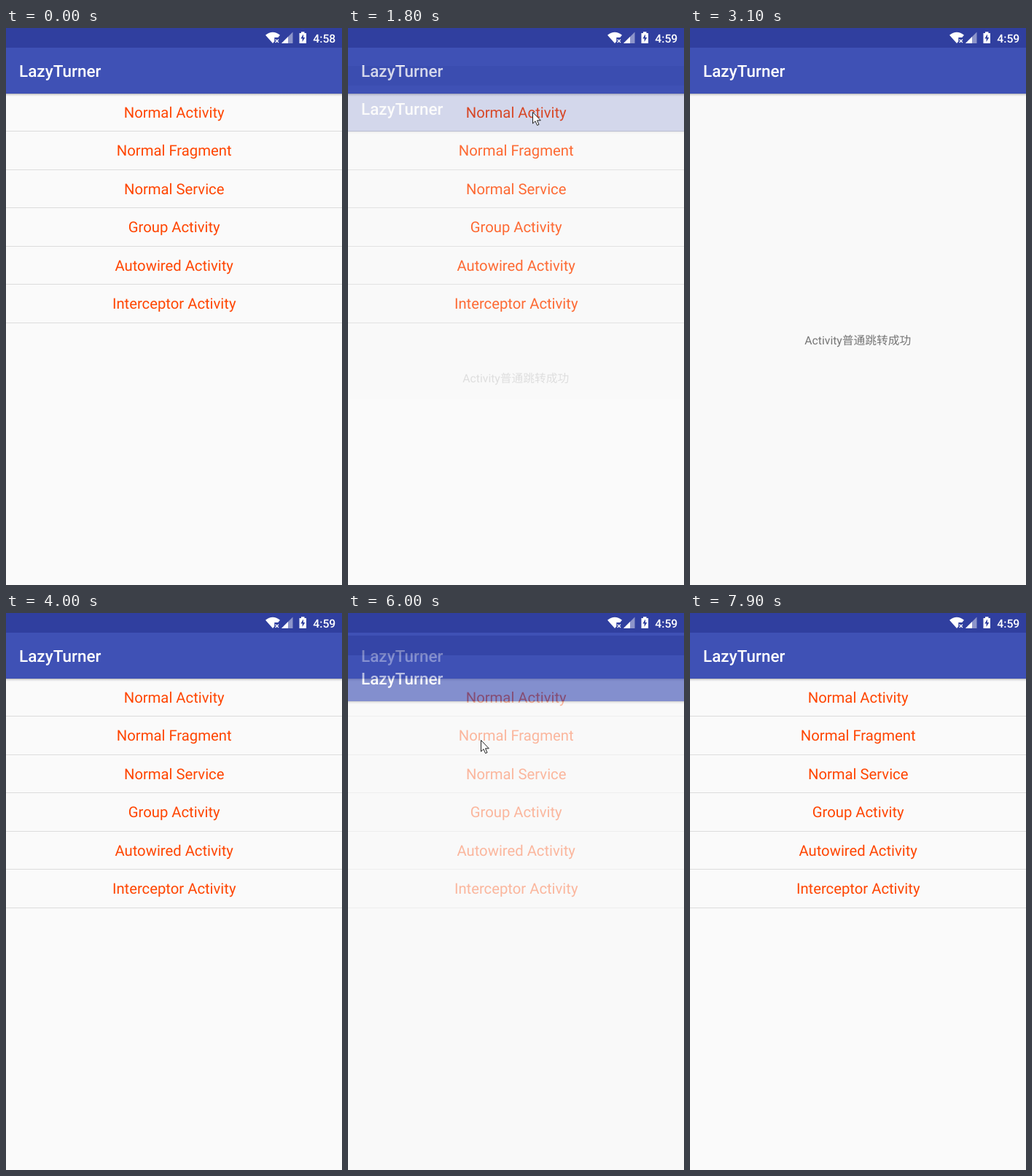
An HTML page for the animation above (8000 ms loop, 461 px wide and 764 px high).

```html
<!DOCTYPE html>
<html lang="zh-CN">
<head>
<meta charset="utf-8">
<title>Router demo</title>
<style>
  html, body { margin: 0; width: 100%; height: 100%; overflow: hidden; background: #fafafa; }
  svg { display: block; width: 461px; height: 764px; }
  text { font-family: Roboto, "Noto Sans CJK SC", "Noto Sans CJK", sans-serif; text-rendering: geometricPrecision; }
  .title { font-size: 22.5px; font-weight: 500; fill: #fff; }
  .row { font-size: 20.25px; fill: #ff4500; text-anchor: middle; }
  .note { font-size: 15.75px; fill: #757575; text-anchor: middle; }
  .clock { font-size: 15.75px; font-weight: 500; fill: #fff; text-anchor: end; }
</style>
</head>
<body>
<svg viewBox="0 0 461 764">
  <defs>
    <linearGradient id="shade" x2="0" y2="1">
      <stop offset="0" stop-opacity=".3"/>
      <stop offset=".4" stop-opacity=".1"/>
      <stop offset="1" stop-opacity="0"/>
    </linearGradient>
    <g id="bar">
      <rect width="461" height="27" fill="#303f9f"/>
      <rect y="27" width="461" height="63" fill="#3f51b5"/>
      <rect y="90" width="461" height="4" fill="url(#shade)"/>
      <text class="title" x="18" y="67">LazyTurner</text>
    </g>
  </defs>

  <g>
    <rect width="461" height="764" fill="#fafafa"/>
    <g id="rows"></g>
    <use href="#bar"/>
  </g>

  <g id="sheet">
    <rect width="461" height="764" fill="#f9f9f9"/>
    <use href="#bar"/>
    <text id="note" class="note" x="230.3" y="434"></text>
  </g>

  <g id="status" fill="#fff">
    <rect width="461" height="27" fill="#303f9f"/>
    <path d="M366 21 356 9.7Q366 2 376 9.7L373.2 13H368.3V18.4Z"/>
    <path d="M369.6 15.6 374 20M374 15.6 369.6 20" stroke="#fff" stroke-width="1.3"/>
    <path d="M378 21 393.5 5.5V21Z" opacity=".45"/>
    <path d="M378 21 387 12V21Z"/>
    <path d="M402.5 7H405V5.2H409.5V7H412V21H402.5Z"/>
    <path d="M408 8.6 404.3 14.6H406.6V19L410.3 13H408Z" fill="#303f9f"/>
    <text id="clock" class="clock" x="452.3" y="20"></text>
  </g>

  <path id="cursor" d="M.5.5V16L4 12.7 6.6 18.5 9 17.4 6.5 11.8H11.3Z" fill="#fff" stroke="#222"/>
</svg>
<script>
const $ = id => document.getElementById(id);
const LOOP = 8000, STEP = 100, SLIDE = 61;

const labels = ['Normal Activity', 'Normal Fragment', 'Normal Service',
  'Group Activity', 'Autowired Activity', 'Interceptor Activity'];
$('rows').innerHTML = labels.map((s, i) =>
  `<text class="row" x="230.7" y="${Math.floor(123.3 + 52.5 * i)}">${s}</text>` +
  `<rect y="${Math.floor(141.5 + 52.5 * i)}" width="461" height="1" fill="#dcdcdc"/>`).join('');

// Pages: start of opening, start of closing, when the note shows
const visits = [
  { open: 1789, close: 3745, end: 4000, noteAt: 1789, note: 'Activity普通跳转成功' },
  { open: 5956, close: 7682, end: 7900, noteAt: 6100, note: 'Fragment普通跳转成功' }
];

// Pointer trips: [time, x, y]
const trips = [
  [[400, 400, 268], [1000, 253, 115], [2300, 253, 115], [3100, 101, 780]],
  [[4200, 65, 716], [5000, 179, 177], [5100, 182, 174], [6300, 182, 174], [7100, 107, 780]]
];

const clamp = v => Math.min(1, Math.max(0, v));
const smooth = p => p * p * (3 - 2 * p);

function sheetAt(t) {
  const v = visits.find(v => t >= v.open && t < v.end);
  if (!v) return null;
  const a = t - v.open, b = t - v.close;
  if (b > 0) {
    return { v, y: SLIDE * clamp(b / 250) ** 4, alpha: 1 - clamp((b - 100) / 150) };
  }
  return { v, y: SLIDE * (1 - clamp(a / 350)) ** 5, alpha: 1 - (1 - clamp(a / 200)) ** 4 };
}

function pointerAt(t) {
  const k = trips.find(k => t >= k[0][0] && t < k[k.length - 1][0]);
  if (!k) return null;
  const i = k.findIndex(p => p[0] > t);
  const [t0, x0, y0] = k[i - 1], [t1, x1, y1] = k[i];
  const p = smooth((t - t0) / (t1 - t0));
  return [x0 + (x1 - x0) * p, y0 + (y1 - y0) * p].map(Math.round);
}

function draw(t) {
  const s = sheetAt(t), p = pointerAt(t);
  $('sheet').style.display = s ? '' : 'none';
  if (s) {
    $('sheet').setAttribute('transform', `translate(0 ${Math.round(s.y)})`);
    $('sheet').setAttribute('opacity', s.alpha);
    $('note').textContent = t >= s.v.noteAt ? s.v.note : '';
  }
  $('cursor').style.display = p ? '' : 'none';
  if (p) $('cursor').setAttribute('transform', `translate(${p})`);
  $('clock').textContent = t < 700 ? '4:58' : '4:59';
}

const start = performance.now();
function tick() {
  const t = (performance.now() - start) % LOOP;
  draw(Math.floor(t / STEP) * STEP);
  requestAnimationFrame(tick);
}
tick();
</script>
</body>
</html>
```
